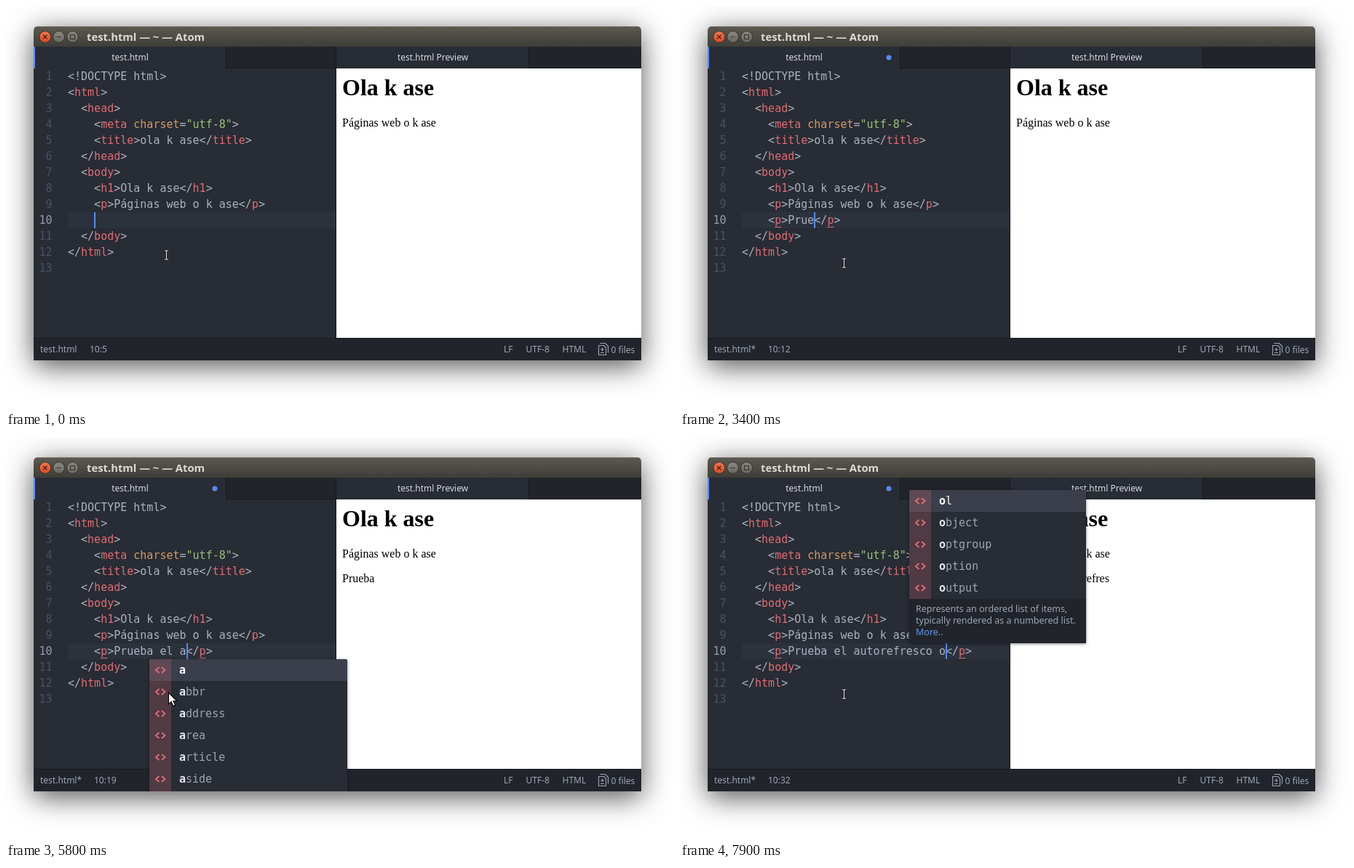
These frames come from a looping animation (918 px wide and 555 px high, 8 s). An HTML page:

```html
<!DOCTYPE html>
<html lang="es">
<head>
<meta charset="utf-8">
<title>Editor con vista previa</title>
<style>
html, body { margin: 0; width: 100%; height: 100%; overflow: hidden; background: #fff; }
.shadow { position: absolute; left: 38px; top: 28px; width: 835px; height: 460px; border-radius: 6px 6px 0 0;
  box-shadow: 0 8px 38px rgba(0,0,0,.68); }
svg { position: absolute; left: 0; top: 0; display: block; }
text { white-space: pre; }
.ui { font: 12px "Noto Sans", "Open Sans", sans-serif; fill: #9da5b4; }
.tab { fill: #d7dae0; text-anchor: middle; }
.title { font: bold 14.8px "Noto Sans", "Open Sans", sans-serif; fill: #dfdbd2; }
.code { font: 15px "DejaVu Sans Mono", monospace; fill: #abb2bf; }
.num { text-anchor: end; fill: #495162; }
.tag { fill: #e06c75; }
.attr { fill: #d19a66; }
.str { fill: #98c379; }
.label { font: 14px "DejaVu Sans Mono", monospace; fill: #686e7a; }
.hit { font-weight: bold; fill: #e4e7ec; }
.help { font: 12.5px "Noto Sans", "Open Sans", sans-serif; fill: #9da5b4; }
.page { font: 16px "Liberation Serif", "Times New Roman", serif; fill: #000; }
.page.big { font-size: 32px; font-weight: bold; }
#popup { filter: drop-shadow(0 1px 2px rgba(0,0,0,.45)); }
</style>
</head>
<body>
<div class="shadow"></div>
<svg width="918" height="555" viewBox="0 0 918 555">
  <defs>
    <linearGradient id="bar" x2="0" y2="1">
      <stop stop-color="#5c5a51"/><stop offset="1" stop-color="#3e3d38"/>
    </linearGradient>
    <linearGradient id="close" x2="0" y2="1">
      <stop stop-color="#f17750"/><stop offset="1" stop-color="#dd4a1e"/>
    </linearGradient>
    <linearGradient id="knob" x2="0" y2="1">
      <stop stop-color="#8b8a80"/><stop offset="1" stop-color="#67665e"/>
    </linearGradient>
    <clipPath id="win"><path d="M38 488V34q0-6 6-6H867q6 0 6 6V488z"/></clipPath>
  </defs>
  <g clip-path="url(#win)">
    <g id="frame"></g>
    <g id="editor"></g>
    <g id="popup"></g>
  </g>
  <g id="mouse"></g>
</svg>
<script>
const LOOP = 8000, CH = 9.03, LEFT = 85, TOP = 86, ROW = 22, ACTIVE = 9;
const $ = id => document.getElementById(id);
const rect = (x, y, w, h, fill, extra = '') =>
  `<rect x="${x}" y="${y}" width="${w}" height="${h}" fill="${fill}" ${extra}/>`;
const text = (x, y, cls, body) => `<text x="${x}" y="${y}" class="${cls}">${body}</text>`;
const span = (cls, body) => `<tspan class="${cls}">${body}</tspan>`;
const stroke = (d, color, w) => `<path d="${d}" fill="none" stroke="${color}" stroke-width="${w}"/>`;
const baseline = i => TOP + ROW * i + 16;

// Colours tags, attributes and strings of one source line
const paint = s => s.replace(/</g, '&lt;').replace(
  /(&lt;\/?)(\w+)(?: (\w+)=("[^"]*"))?/g,
  (m, open, tag, attr, str) => open + span('tag', tag) +
    (attr ? ' ' + span('attr', attr) + '=' + span('str', str) : ''));

const codeLine = (s, i) => {
  const indent = s.length - s.trimStart().length;
  return text(LEFT + indent * CH, baseline(i), 'code', paint(s.trimStart()));
};

const source = [
  '<!DOCTYPE html>',
  '<html>',
  '  <head>',
  '    <meta charset="utf-8">',
  '    <title>ola k ase</title>',
  '  </head>',
  '  <body>',
  '    <h1>Ola k ase</h1>',
  '    <p>Páginas web o k ase</p>',
  '',
  '  </body>',
  '</html>',
  ''
];

function drawFrame() {
  const knob = (x, fill) => `<circle cx="${x}" cy="42.5" r="7.9" fill="url(#${fill})" stroke="#33322d"/>`;
  const title = rect(38, 28, 835, 28, 'url(#bar)') + rect(38, 28, 835, 1, '#6c6a60') +
    knob(53.8, 'close') + knob(72.6, 'knob') + knob(91.5, 'knob') +
    stroke('M51 39.8l5.5 5.5m0-5.5l-5.5 5.5', '#4a2013', 1.3) +
    stroke('M69.5 42.5h6.2M88.5 39.5h6v6h-6z', '#35342f', 1.2) +
    text(111, 48, 'title', 'test.html — ~ — Atom');
  const tabs = rect(38, 56, 835, 30, '#21252b') +
    rect(303, 85, 150, 1, '#181a1f') + rect(718, 85, 155, 1, '#181a1f') +
    rect(38, 56, 264, 30, '#282c34') + rect(38, 56, 2, 30, '#568af2') + rect(302, 56, 1, 30, '#181a1f') +
    rect(454, 56, 264, 30, '#282c34') + rect(718, 56, 1, 30, '#181a1f') +
    text(170.5, 75, 'ui tab', 'test.html') + text(586.5, 75, 'ui tab', 'test.html Preview');
  const panes = rect(38, 86, 415, 371, '#282c34') + rect(454, 86, 419, 371, '#fff') +
    rect(453, 56, 1, 401, '#181a1f') + rect(LEFT, TOP + ROW * ACTIVE, 453 - LEFT, ROW, '#2c323c');
  const status = rect(38, 457, 835, 31, '#21252b') + rect(38, 457, 835, 1, '#181a1f') +
    text(684, 477, 'ui', 'LF') + text(714.5, 477, 'ui', 'UTF-8') +
    text(764.5, 477, 'ui', 'HTML') + text(831.5, 478, 'ui', '0 files') +
    stroke('M814.5 467.5h7l3 3v10h-10zM816.5 464.5h7l4 4v9M817 473h5m-2.5-2.5v5M817 477.5h5', '#9da5b4', 1.1);
  const numbers = source.map((s, i) =>
    `<text x="63.5" y="${baseline(i)}" class="code num" ${i === ACTIVE ? 'style="fill:#959ca8"' : ''}>${i + 1}</text>`);
  const page = text(462, 123, 'page big', 'Ola k ase') + text(462, 166, 'page', 'Páginas web o k ase');
  $('frame').innerHTML = title + tabs + panes + status + numbers.join('') +
    source.map(codeLine).join('') + page;
}

function drawEditor({ raw, body, caret, dirty, preview }) {
  const inTag = body !== null;
  const line = inTag ? `<p>${body}</p>` : raw;
  const pos = 4 + (inTag ? 3 + body.length : raw.length);
  const at = n => LEFT + n * CH;
  const mark = n => rect(at(n), 304, CH, 1, '#e06c75');
  $('editor').innerHTML = codeLine('    ' + line, ACTIVE) +
    (inTag ? mark(5) + mark(pos + 2) : '') +
    (caret ? rect(Math.round(at(pos)), TOP + ROW * ACTIVE, 2, ROW, '#528bff') : '') +
    (dirty ? '<circle cx="287" cy="71" r="3.5" fill="#568af2"/>' : '') +
    text(47, 477, 'ui', 'test.html' + (dirty ? '*' : '')) +
    text(dirty ? 121 : 115, 477, 'ui', '10:' + (pos + 1)) +
    text(462, 200, 'page', preview);
}

const tagIcon = (x, y) => stroke(`M${x + 13.5} ${y - 4}l-4.5 4 4.5 4m3.5-8l4.5 4-4.5 4`, '#e06c75', 1.9);
const snippetIcon = (x, y) =>
  `<path d="M${x + 7} ${y - 2}h5v-3l6 5-6 5v-3h-5zM${x + 19} ${y - 5}h4v10h-4z" fill="#98c379"/>`;

function drawPopup(p) {
  if (!p) { $('popup').innerHTML = ''; return; }
  const { x, y = 306, w = 243, words, labels, help = [] } = p;
  const listH = words.length * 30;
  const helpH = help.length ? 29 + 16 * help.length : 0;
  const tint = labels ? '#98c379' : '#e06c75';
  const rows = words.map((word, i) => {
    const top = y + i * 30, mid = top + 15;
    const color = i ? '#9da5b4' : '#fff';
    return (i ? '' : rect(x, top, w, 30, '#3a3f4b', 'rx="2"')) +
      rect(x, top, 30, 30, tint, 'fill-opacity=".22"') +
      (labels ? snippetIcon : tagIcon)(x, mid) +
      `<text x="${x + 41}" y="${top + 20}" class="code" style="fill:${color}">` +
      `<tspan class="hit" ${i ? '' : 'style="fill:#fff"'}>${word[0]}</tspan>${word.slice(1)}</text>` +
      (labels ? `<text x="${x + 128}" y="${top + 20}" class="label" ${i ? '' : 'style="fill:#9da5b4"'}>${labels[i]}</text>` : '');
  });
  const bottom = y + listH;
  const note = help.length
    ? rect(x, bottom, w, helpH, '#21252b') +
      help.map((s, i) => text(x + 9, bottom + 18 + 16 * i, 'help', s)).join('') +
      `<text x="${x + 9}" y="${bottom + 18 + 16 * help.length}" class="help" style="fill:#6494ed">More..</text>`
    : '';
  $('popup').innerHTML = rect(x, y, w, listH + helpH, '#282c34', 'rx="3"') + rows.join('') + note;
}

function drawMouse([kind, x, y]) {
  const beam = `M${x - 2.5} ${y - 6}h2l.5 .5 .5-.5h2M${x} ${y - 5.5}v11M${x - 2.5} ${y + 6}h2l.5-.5 .5 .5h2`;
  $('mouse').innerHTML = kind === 'beam'
    ? stroke(beam, '#16181c', 3) + stroke(beam, '#e8e8e8', 1.1)
    : `<path d="M${x} ${y}v15.6l3.6-3.3 2.7 6 2.8-1.2-2.7-5.8h4.9z" fill="#fff" stroke="#000" stroke-width="1.1"/>`;
}

const beam = ['beam', 225.5, 354], arrow = ['arrow', 223.5, 352.2];
const snippets = {
  x: 80, w: 289, words: ['p', 'param', 'pre', 'picture', 'progress'],
  labels: ['Paragraph', 'Parameter', 'Preformatted Text', 'Picture', 'Progress']
};
const pTags = { x: 107, words: ['p', 'param', 'pre', 'progress'], help: ['Represents a paragraph of text.'] };
const eTags = { x: 170, words: ['em', 'embed'], help: ['Represents emphasized text.'] };
const aTags = { x: 197, w: 272, words: ['a', 'abbr', 'address', 'area', 'article', 'aside', 'audio'] };
const auTags = { x: 197, words: ['audio'], help: ['Represents a sound or audio stream.'] };
const oTags = {
  x: 315, words: ['ol', 'object', 'optgroup', 'option', 'output'],
  help: ['Represents an ordered list of items,', 'typically rendered as a numbered list.']
};

const type = (body, more) => ({ body, caret: true, ...more });
const steps = [
  [0, { raw: '', body: null, caret: true, dirty: false, preview: '', popup: null, mouse: ['beam', 220.5, 343] }],
  [100, { mouse: ['beam', 222.5, 348] }],
  [200, { mouse: beam }],
  [300, { caret: false }],
  [700, { caret: true }],
  [1100, { caret: false }],
  [1500, { raw: 'p', caret: true }],
  [1600, { popup: snippets, mouse: arrow }],
  [1900, { caret: false, dirty: true }],
  [2000, { preview: 'p' }],
  [2200, type('', { popup: null })],
  [2500, { preview: '' }],
  [2600, { caret: false }],
  [2900, type('P', { popup: pTags })],
  [3100, type('Pr')],
  [3200, type('Pru', { popup: null })],
  [3400, type('Prue', { mouse: beam })],
  [3700, type('Prueb')],
  [4000, type('Prueba')],
  [4300, { caret: false }],
  [4400, { preview: 'Prueba' }],
  [4700, { caret: true }],
  [5000, type('Prueba ')],
  [5100, type('Prueba e')],
  [5200, { popup: eTags, mouse: arrow }],
  [5300, type('Prueba el', { popup: null })],
  [5400, type('Prueba el ', { mouse: beam })],
  [5600, type('Prueba el a', { popup: aTags, mouse: arrow })],
  [5900, type('Prueba el au', { popup: auTags })],
  [6100, type('Prueba el aut', { popup: null })],
  [6200, type('Prueba el auto', { mouse: beam })],
  [6400, type('Prueba el autore')],
  [6500, type('Prueba el autoref')],
  [6700, type('Prueba el autorefre')],
  [6900, type('Prueba el autorefres')],
  [7300, type('Prueba el autorefresc', { preview: 'Prueba el autorefres' })],
  [7400, type('Prueba el autorefresco')],
  [7600, type('Prueba el autorefresco ')],
  [7800, type('Prueba el autorefresco o', { popup: oTags })],
  [7900, { popup: { ...oTags, y: 73 } }]
];

let shown = -1;
function update(t) {
  const count = steps.filter(([start]) => start <= t).length;
  if (count === shown) return;
  shown = count;
  const state = Object.assign({}, ...steps.slice(0, count).map(s => s[1]));
  drawEditor(state);
  drawPopup(state.popup);
  drawMouse(state.mouse);
}

drawFrame();
update(0);
const begin = performance.now();
(function tick() {
  update((performance.now() - begin) % LOOP);
  requestAnimationFrame(tick);
})();
</script>
</body>
</html>
```
